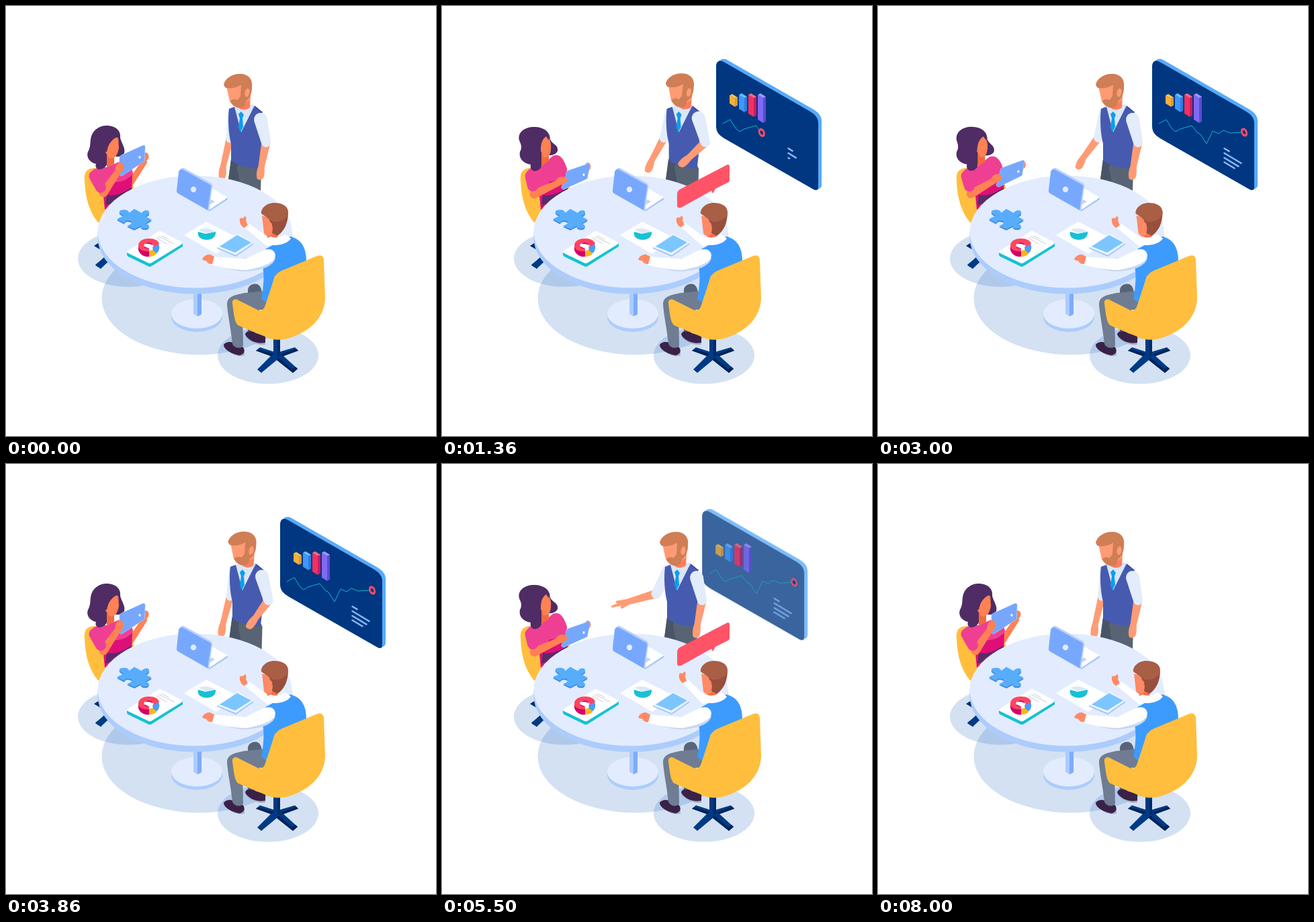
Write an HTML page with a canvas that moves like this. It is 640x640 px and loops after 8430 ms.

```html
<!DOCTYPE html>
<html lang="en">
<head>
<meta charset="utf-8">
<title>Team meeting</title>
<style>
html, body { margin: 0; width: 100%; height: 100%; overflow: hidden; background: #fff; }
canvas { display: block; width: 100vw; height: 100vh; }
</style>
</head>
<body>
<canvas id="stage" width="640" height="640"></canvas>
<script>
const LOOP = 8430, FPS = 14, LAST = 112;
const stage = document.getElementById('stage').getContext('2d');
const layer = document.createElement('canvas');
layer.width = layer.height = 640;
const layerCtx = layer.getContext('2d');
let g = stage;

// ---------- helpers ----------
const lerp = (a, b, k) => a + (b - a) * k;
const lerpAll = (a, b, k) => a.map((v, i) => lerp(v, b[i], k));
const span = (t, a, b) => Math.min(1, Math.max(0, (t - a) / (b - a)));
const ease = (t, a, b) => { const k = span(t, a, b); return k * k * (3 - 2 * k); };
const pulse = (t, a, b, c, d) => ease(t, a, b) - ease(t, c, d);

function fill(color, d) { g.fillStyle = color; g.fill(new Path2D(d)); }
function line(color, width, d) {
  g.strokeStyle = color; g.lineWidth = width;
  g.lineCap = g.lineJoin = 'round';
  g.stroke(new Path2D(d));
}
function oval(color, x, y, rx, ry, rot = 0) {
  g.fillStyle = color; g.beginPath();
  g.ellipse(x, y, rx, ry, rot, 0, 7); g.fill();
}
// Blend two paths that share the same commands.
function mix(a, b, k) {
  const num = /-?\d+(\.\d+)?/g, to = b.match(num);
  let i = 0;
  return a.replace(num, v => lerp(+v, +to[i++], k).toFixed(2) + ' ');
}
// Tapered limb with round ends.
function limb(color, x1, y1, r1, x2, y2, r2) {
  const a = Math.atan2(y2 - y1, x2 - x1), q = Math.PI / 2;
  g.fillStyle = color; g.beginPath();
  g.arc(x1, y1, r1, a + q, a - q);
  g.arc(x2, y2, r2, a - q, a + q);
  g.closePath(); g.fill();
}
function at(x, y, rot, scale, draw) {
  g.save(); g.translate(x, y); g.rotate(rot); g.scale(scale, scale);
  draw(); g.restore();
}
// Draw a group as one flat picture with a shared opacity.
function group(alpha, dx, dy, draw) {
  g = layerCtx;
  g.clearRect(0, 0, 640, 640);
  draw();
  g = stage;
  g.globalAlpha = alpha;
  g.drawImage(layer, dx, dy);
  g.globalAlpha = 1;
}

// ---------- wall screen ----------
const PANEL = 'M408 90C408 82 413 80 419 83L548 157C556 162 560 167 560 175V269C560 274 557 275 553 273L420 197C412 192 408 187 408 179Z';
const TREND = [[418,175],[429,169],[437,182],[443,187],[450,183],[467,178],[475,188],[480,191],[489,205],[498,186],[507,190],[514,185],[524,189],[545,188]];
const BARS = [
  [150, 10, '#ffc247', '#d99a35', '#f3b13d'],
  [158, 19, '#6cbcff', '#2b7de0', '#3e97fa'],
  [165, 26, '#ff6b7e', '#c81b67', '#f6305f'],
  [174, 35, '#a596ff', '#5d4bd0', '#7d6af5']
];

function bar(x, bot, h, top, right, left) {
  const y = bot - h;
  fill(left, `M${x} ${y + 2}L${x + 8} ${y + 7}V${bot}L${x} ${bot - 5}Z`);
  fill(right, `M${x + 8} ${y + 7}L${x + 12} ${y + 5}V${bot - 2}L${x + 8} ${bot}Z`);
  fill(top, `M${x} ${y + 2}L${x + 4} ${y}L${x + 12} ${y + 5}L${x + 8} ${y + 7}Z`);
}

function trend(p) {
  const len = TREND.slice(1).map((q, i) => Math.hypot(q[0] - TREND[i][0], q[1] - TREND[i][1]));
  let left = p * len.reduce((a, b) => a + b), end = TREND[0], d = 'M' + end;
  for (let i = 0; i < len.length && left > 0; i++) {
    end = lerpAll(TREND[i], TREND[i + 1], Math.min(1, left / len[i]));
    left -= len[i];
    d += 'L' + end;
  }
  line('#16b4cc', 1, d);
  oval('#ff4d6a', end[0], end[1], 4.7, 6.8, -.4);
  oval('#003780', end[0], end[1], 2, 3.2, -.4);
}

function panel() {
  for (let i = 10; i > 0; i--) at(i * .5, -i * .3, 0, 1, () => fill('#58aafb', PANEL));
  fill('#003780', PANEL);
}

function charts(t) {
  const grow = ease(t, 290, 1050);
  BARS.forEach(([bot, gain, ...tones], i) => bar(428 + i * 14, bot, 9 + gain * grow, ...tones));
  trend(.03 + .97 * ease(t, 450, 2450));
  [[212, 7], [219, 25], [226, 21], [232.5, 15]].forEach(([y, w], i) => {
    const k = ease(t, 1050 + i * 120, 1450 + i * 120) * w;
    if (k > 0) line('#86b4f8', 2.6, `M515.5 ${y}l${k} ${k * .6}`);
  });
}

function wallScreen(t) {
  const enter = 1 - (1 - span(t, 150, 1000)) ** 3;
  const out = span(t, 5070, 5890);
  const alpha = enter * (1 - out ** 2.3);
  if (alpha <= 0) return;
  const dx = 35 * (1 - enter) - 76 * out ** 2;
  const dy = -20 * (1 - enter) - 43 * out ** 2;
  group(alpha, dx, dy, panel);
  group(alpha, dx, dy, () => charts(t));
}

// ---------- standing man ----------
const SKIN = '#ff9b74';
const pointHand = () => fill(SKIN, 'M-3 -4L5 -6L12 -8L14 -5L11 -3L26 -2C28 -1 27 1 25 1L16 2L19 4L17 6L6 5L-3 4Z');
const restHand = () => fill(SKIN, 'M-3 -4C4 -6 10 -7 15 -6C19 -4 20 0 18 3C13 6 4 6 -3 4Z');

function standingMan(t) {
  const turn = pulse(t, 90, 560, 1000, 1750) + pulse(t, 3560, 4260, 4500, 5050);
  const reach = pulse(t, 1150, 1750, 2650, 3300) + pulse(t, 4550, 5130, 5540, 6150);
  const wave = .5 + .5 * Math.cos((t - 5500) / 940 * 2 * Math.PI);

  at(4 * turn, 0, 0, 1, () => {
    fill('#586474', 'M335 228L378 238L380 242L379 277L350 277L330 266Z');
    fill('#495567', 'M335 228L346 235L344 240L349 270L330 266Z');
  });

  // far arm
  const sx = 5 * turn;
  const elbow = lerpAll([333 + turn, 198], lerpAll([321, 195], [319, 193], wave), reach);
  const wrist = lerpAll([323 - turn, 240 - 3 * turn], lerpAll([284, 211], [277, 205], wave), reach);
  const dir = lerp(1.72 + .15 * turn, lerp(2.45, 2.87, wave), reach);
  limb(SKIN, ...elbow, lerp(5.5, 6.5, reach), ...wrist, 4.3);
  at(...wrist, dir, .97, reach > .5 ? pointHand : restHand);
  limb('#e3ecfb', 337 + sx, 158, lerp(7, 9, reach), ...elbow, lerp(5.5, 7.5, reach));

  at(sx, 0, 0, 1, () => {
    fill('#34439a', 'M364 147L371 149L382 158L378 165Z');
    fill('#dbe5f5', 'M339 151L350 146L368 147L371 152L350 190L343 175Z');
    fill('#465bb0', 'M332 153L340 150L350 188L369 150L379 157C384 163 382 171 378 178L381 206L377 241C362 243 345 237 335 230L335 205C331 190 330 168 332 153Z');
    fill('#0a9ef0', 'M346 161L350 157L354 162L352 167L353 180L349 188L346 180L348 167Z');
  });

  // head
  at(355 + 14 * turn, 152 - turn, .07 * turn, 1, () => {
    g.translate(-355, -152);
    fill('#ff7d5b', 'M344 138L364 132L363 151C357 156 349 155 346 151Z');
    fill(SKIN, 'M328 119L333 142C337 148 343 150 350 148L363 140V112L345 108Z');
    fill('#cf7e56', 'M334 142C336 138 341 138 345 140L349 134L350 117C343 122 331 124 326 121L324 117C326 108 336 101 348 101C361 101 368 109 366 122C366 130 363 136 360 139L357 142L355 149C350 154 338 152 334 142Z');
    oval(SKIN, 359, 129, 3.4, 6.5, .2);
  });

  // near arm
  const e2 = lerpAll([387, 203], [396, 203], turn);
  const w2 = lerpAll([380, 240], [357, 213], turn);
  limb(SKIN, ...e2, 6.6, ...w2, 4.6);
  at(...w2, lerp(1.75, 3.1, turn), lerp(1, 1.05, turn), restHand);
  limb('#e3ecfb', lerp(379, 384, turn), lerp(169, 165, turn), 10, ...e2, 7);
}

// ---------- seated woman ----------
function woman(k) {
  const rose = '#ff8154';
  // chair
  fill('#002d6b', 'M131 357L137 353L152 361L157 368L141 391L133 386L146 374L146 366Z');
  fill('#003a85', 'M133 385L152 370L157 376L141 391Z');
  fill('#ffbe3d', 'M117 260C116 246 121 243 130 241L186 255L190 270L188 330L137 322C125 308 118 288 117 260Z');

  // far arm
  limb(rose, ...lerpAll([186, 262], [180, 262], k), 5, ...lerpAll([206, 232], [211, 243], k), 4);

  fill('#df0f78', 'M143 262L188 250L187 285L147 303Z');
  fill('#ef3f93', mix(
    'M124 253C128 241 139 238 150 240L168 232C180 231 189 240 189 250C180 260 168 263 160 262L154 276L143 284Z',
    'M124 253C127 241 138 237 148 238L165 223C175 219 181 226 186 242C187 256 174 261 160 261L154 274L143 284Z', k));
  fill('#5a2b68', 'M150 281C162 284 176 278 187 270L187 283C177 288 161 292 148 297Z');

  // head
  fill('#4f2c64', mix(
    'M126 198C128 184 140 177 152 178C165 179 171 187 170 196C172 205 178 211 176 219C171 227 161 224 156 222L149 238C141 247 131 243 134 235C124 233 119 224 122 217C126 210 125 205 126 198Z',
    'M115 200C112 188 123 180 137 180C152 180 161 188 161 198C163 206 174 206 172 216C168 224 158 222 152 222L147 241C139 250 130 245 132 236C120 234 114 226 116 217C120 210 117 205 115 200Z', k));
  fill('#f26a3d', mix('M150 222L161 220L161 236L150 240Z', 'M148 219L159 220L159 231L148 238Z', k));
  fill(rose, mix(
    'M147 216C152 206 159 196 167 195L168 211C166 224 160 229 153 226Z',
    'M145 211C146 201 151 193 158 191L162 205C163 219 160 226 151 225Z', k));
  fill('#4f2c64', mix(
    'M142 190L163 184C170 188 171 194 169 199L165 195C157 198 152 206 150 217L141 218Z',
    'M134 188L152 184C158 187 160 193 159 200L155 194C149 198 147 205 147 215L138 218Z', k));

  // tablet
  const pad = mix(
    'M169 227C169 224 170 223 172 222L203 208C206 207 207 208 207 210L206 231L172 253L169 251Z',
    'M185 250C185 247 186 246 188 245L217 235C220 234 221 236 220 238L216 257L181 273L178 271Z', k);
  const thumb = lerpAll([208, 224], [217, 239], k);
  oval(rose, ...thumb, 4.5, 6);
  line('#c4dafe', 1, pad);
  fill('#76a7fd', pad);
  oval('#fff', ...lerpAll([199, 225], [211, 251], k), 1.5, 1.9);

  // near arm
  const elbow = lerpAll([145, 278], [137, 280], k);
  const wrist = lerpAll([167, 246], [174, 263], k);
  limb(rose, ...elbow, 6.5, ...wrist, 4.5);
  at(...lerpAll([169, 241], [178, 260], k), lerp(-1.2, -.25, k), 1, () => oval(rose, 0, 0, 8.5, 6));
  limb('#ef3f93', 132, 253, 8.5, ...lerpAll([141, 270], [135, 268], k), 8);
}

// ---------- table ----------
function table() {
  oval('#acccfc', 284, 463, 38, 22);
  oval('#e2ecfe', 284, 458, 38, 22);
  fill('#acccfc', 'M279 424H285V462L279 458Z');
  fill('#7dacfb', 'M285 424H291V459L285 462Z');
  oval('#acccfc', 281, 345, 144.5, 83.5);
  g.fillStyle = '#acccfc'; g.fillRect(136.5, 336, 289, 9);
  oval('#e2ecfe', 281, 336, 144.5, 83.5);
}

function laptop() {
  fill('#a6c5fb', 'M302 301L330 285V288L302 306Z');
  fill('#fff', 'M306 271L330 285L303 303L300 298Z');
  fill('#c7d5ec', 'M306 288L311 291L303 296L303 290Z');
  fill('#b5d0ff', 'M260 243C262 240 265 241 268 243L304 263C307 265 308 267 307 270L302 305L298 303Z');
  fill('#78a8fd', 'M257 247C258 243 261 242 264 244L302 265C305 266 306 268 305 271L300 304L256 279C254 278 254 276 254 274Z');
  oval('#e2ecfe', 279, 273, 4.2, 4.2);
}

const PUZZLE = 'M165 317L176 312C170 310 166 306 171 304C178 302 184 305 183 308L191 302L202 308C205 303 213 303 213 307C214 311 208 312 207 313L217 318L207 324C213 325 215 328 210 331C204 332 200 330 201 327L191 332L180 327C188 325 189 321 185 320C180 318 176 321 176 323Z';

function papers() {
  at(0, 2, 0, 1, () => fill('#3c8be6', PUZZLE));
  fill('#58adfb', PUZZLE);

  // report with ring chart
  fill('#17c1d4', 'M180 367L214 383L263 353V358L217 387Q214 389 211 387L182 373Q180 372 180 370Z');
  fill('#fff', 'M182 364L226 336Q229 334 232 336L261 351Q264 353 261 355L217 382Q214 384 211 382L182 368Q179 366 182 364Z');
  fill('#d4006a', 'M197 357V363C199 370 206 374 213 373V361L204 357Z');
  fill('#f9b51c', 'M213 365L222 361L224 369C221 372 217 373 213 373Z');
  fill('#4a9cf8', 'M218 359L227 354C229 358 229 364 224 368L219 364Z');
  fill('#ff4560', 'M197 358C196 350 204 346 213 346C221 346 227 349 228 354L219 359C221 355 217 352 212 352C206 352 204 356 206 359C208 361 210 361 213 361V365C205 366 198 363 197 358Z');
  fill('#d4006a', 'M207 354C209 351 218 351 219 356L213 354Z');
  line('#c9cdd6', 1, 'M224 345L239 354M227 343L250 354M231 342L242 347');

  // sheet with pie chart
  fill('#fff', 'M265 341L298 321L345 345L313 369Z');
  fill('#d9e8f8', 'M297 338L287 333C293 330 307 331 311 336Z');
  fill('#17c1d4', 'M286 336L297 339L312 336C313 343 307 348 299 348C290 348 284 343 286 336Z');

  // tablet
  fill('#9fc4f7', 'M314 359L342 371L368 353V355L342 373L314 361Z');
  fill('#eef4ff', 'M314 359L343 340Q345 339 347 340L368 352L342 370Z');
  fill('#7cc6ff', 'M318 358L344 341L365 352L341 367Z');
}

// ---------- seated man ----------
function seatedMan(t, look) {
  const lift = pulse(t, 150, 560, 850, 1500) + pulse(t, 4200, 4900, 5250, 5900);
  const skin = '#ff8a65';

  // chair base
  fill('#003a85', 'M372 513L378 508L403 516L430 508L435 513L413 521L434 540L427 546L403 527L380 546L374 541L394 521Z');
  fill('#002357', 'M372 513L394 521L400 518L375 511ZM403 527L427 546L434 540L431 537L426 541L405 523ZM413 521L435 513L432 510L408 519Z');
  fill('#003a85', 'M398 490H408V520L403 523L398 520Z');
  fill('#002b66', 'M404 490H408V520L404 523Z');

  // legs
  fill('#a9b4cb', 'M357 493C364 501 376 506 386 504V501L358 489Z');
  fill('#3a2148', 'M356 489C358 482 366 483 372 487L386 491V501C375 504 360 498 356 489Z');
  fill('#57647a', 'M360 425C359 416 368 412 374 414C380 417 382 425 380 433L372 485L360 484Z');
  fill('#a9b4cb', 'M325 508C332 517 346 524 355 520V516L326 505Z');
  fill('#3a2148', 'M324 504C328 499 336 499 342 503L353 508C357 514 354 519 347 520C337 518 324 512 324 504Z');
  fill('#6f7c92', 'M329 444C329 433 339 430 356 427L388 424L390 452L352 452L353 506C348 511 340 509 337 503C335 482 330 460 329 444Z');

  // raised arm
  const hand = lerpAll([354, 321], [361, 315], lift);
  const cuff = lerpAll([360, 328], [365, 323], lift);
  limb('#fff', ...lerpAll([391, 352], [389, 350], lift), 6, ...cuff, 4.5);
  at(hand[0], hand[1], lerp(0, .12, lift), 1, () =>
    fill(skin, 'M-6 -4C-4 -7 -1 -4 0 -6L1 -8C4 -8 4 -4 3 -1L6 5L1 9C-3 8 -7 2 -6 -4Z'));

  // vest
  fill('#3d9bfd', 'M386 362L400 354L423 343C440 347 447 360 447 380L400 402L388 442L380 436C383 420 385 402 382 388Z');

  // head
  at(5 * look, 0, 0, 1, () => {
    fill('#f5704a', 'M388 330L405 330L404 347L394 350L389 346Z');
    fill(skin, 'M381 312L384 338C387 344 393 343 397 339L402 318Z');
    fill('#984f3c', 'M389 313L420 306C420 324 414 335 404 342L396 338L397 330C394 324 393 319 389 313Z');
    fill('#a85f46', 'M380 309C379 302 387 293 399 293C413 293 421 299 420 309C418 317 408 322 397 321L390 316Z');
    oval(skin, 393, 328, 3, 5.5, .2);
  });
  fill('#fff', 'M387 346L394 343C401 347 409 343 416 340L424 346C419 354 404 358 392 355Z');

  // resting arm
  fill('#c8d8f2', 'M308 382C330 392 345 396 360 395C382 393 398 387 401 375L380 372Z');
  fill('#fff', 'M380 365C391 359 400 362 401 371C400 382 384 388 358 393C340 393 320 389 306 385C305 381 306 376 309 373C325 374 345 376 357 376Z');
  fill(skin, 'M292 377C294 372 300 369 304 370L310 373L307 384C302 384 299 382 298 379C296 379 294 379 292 377Z');

  // chair shell
  fill('#ffbe3d', 'M337 443C336 437 341 435 346 438L374 452C380 455 384 452 386 445L399 406C401 400 404 397 410 394L463 372C469 370 473 373 473 378L475 435C474 462 455 482 428 492C412 498 400 498 390 494C375 487 358 481 345 475C341 471 340 463 339 458Z');
}

function bubble(k) {
  if (k <= 0) return;
  at(403, 278, 0, k, () => {
    g.translate(-403, -278);
    fill('#ff5468', 'M350 280C350 276 352 274 354 273L423 237C426 235 428 236 428 239V258C428 261 427 262 425 263L407 272L403 279L401 275L356 300C352 301 350 300 350 297Z');
  });
}

// ---------- scene ----------
function draw(t) {
  const lean = pulse(t, 120, 980, 2700, 3800) + pulse(t, 4300, 5250, 6950, 8000);
  const look = pulse(t, 220, 850, 2750, 3450) + pulse(t, 4250, 5000, 6850, 7550);
  const talk = pulse(t, 330, 640, 2650, 3000) + pulse(t, 4400, 4710, 6780, 7130);
  const shade = 'rgba(36,106,192,.2)';

  g.fillStyle = '#fff';
  g.fillRect(0, 0, 640, 640);
  oval(shade, 182, 376, 75, 42);
  oval(shade, 287, 435, 144.5, 84);
  oval(shade, 390, 520, 75, 42.5);
  wallScreen(t);
  woman(lean);
  standingMan(t);
  table();
  laptop();
  papers();
  seatedMan(t, look);
  bubble(talk);
}

function tick() {
  const ms = performance.now() % LOOP;
  const step = Math.min(LAST, Math.floor((ms + 5) * FPS / 1000));
  draw(step * 1000 / FPS);
  requestAnimationFrame(tick);
}
tick();
</script>
</body>
</html>
```
